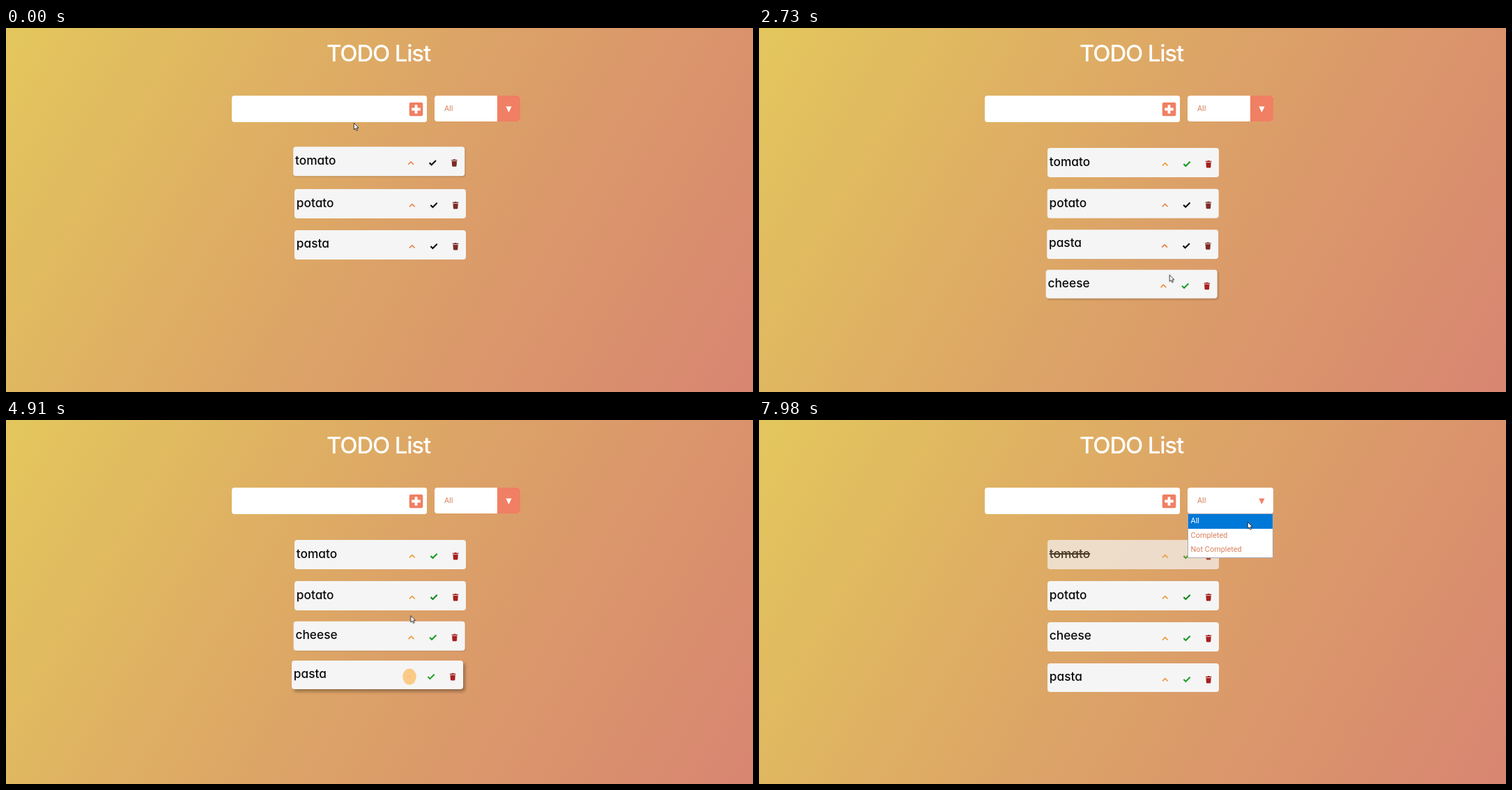
Write an HTML page that moves like this. It is 1072x522 px and loops after 8 s.

```html
<!DOCTYPE html>
<html lang="en">
<head>
<meta charset="utf-8">
<title>TODO List</title>
<style>
@property --lift { syntax: "<number>"; inherits: false; initial-value: 0; }
@property --glow { syntax: "<number>"; inherits: true; initial-value: 0; }

:root {
  --smooth: 8s linear infinite;
  --cut: 8s step-end infinite;
  --coral: #f07f63;
}
html, body { margin: 0; width: 100%; height: 100%; overflow: hidden; }
body {
  position: relative;
  background: linear-gradient(120deg, #e3c75c, #dca367 50%, #d88571);
  font-family: Inter, "Open Sans", sans-serif;
  font-feature-settings: "cv11";
  font-weight: 500;
}
body * { position: absolute; box-sizing: border-box; white-space: pre; }
svg { overflow: visible; left: 0; top: 0; }

h1 {
  margin: 0; left: 460px; top: 16px;
  font-size: 33px; line-height: 40px; font-weight: 500;
  font-optical-sizing: none; letter-spacing: -1.2px; color: #fff;
}

/* Entry field */
.entry { left: 323.7px; top: 97px; width: 280px; height: 38px; border-radius: 4px; background: #fff; overflow: hidden; }
.typed {
  left: 6px; top: 5px; height: 28px; font-size: 18.5px; line-height: 28px; color: #111;
  border-right: 1px solid transparent; animation: caret var(--cut);
}
.typed::before { content: ""; animation: type var(--cut); }
.add { right: 0; top: 0; width: 31px; height: 38px; background: #fff; color: var(--coral); animation: add var(--smooth); }

/* Filter */
.filter { left: 615px; top: 97.4px; width: 123px; height: 37px; border-radius: 4px; background: #fff; overflow: hidden; }
.filter, .menu { font: 10.9px/20.7px Roboto, sans-serif; color: #d9805c; }
.filter span { left: 14px; top: 8.5px; }
.drop { right: 0; top: 0; width: 33px; height: 37px; background: var(--coral); color: #fff; animation: drop var(--smooth); }
.menu {
  left: 615px; top: 134px; width: 123px; height: 63.6px; background: #fff; border: 1px solid #a9a9b4;
  visibility: hidden; animation: menu var(--cut);
}
.menu span { left: 0; width: 121px; height: 20.7px; padding-left: 3.6px; }
.menu span:nth-child(1) { top: 0; background: #0078d7; color: #fff; }
.menu span:nth-child(2) { top: 20.7px; }
.menu span:nth-child(3) { top: 41.4px; }

/* Items */
.row {
  --up: #e8844a; --ok: #0c0c0c; --bin: #7c2d26;
  left: 413.5px; width: 246px; height: 41.8px; border-radius: 4px; background: #f5f5f5;
  translate: calc(var(--lift) * -5.5px) calc(var(--lift) * -5.5px);
  box-shadow: calc(var(--lift) * 4px) calc(var(--lift) * 5px) calc(var(--lift) * 6px) rgb(0 0 0 / calc(var(--lift) * .42));
}
.row b { left: 3.3px; top: 8.5px; font-size: 17.3px; line-height: 22px; font-weight: 500; color: #0a0a0a; }
.r1 { top: 172px; animation: lift1 var(--smooth), glow1 var(--smooth), done var(--smooth), tone1 var(--cut); }
.r2 { top: 231px; animation: lift2 var(--smooth), tone2 var(--cut); }
.r3 { top: 289.8px; animation: lift3 var(--smooth), tone3 var(--cut); }
.r4 {
  top: 348.5px; --up: #ee9440; --ok: #22a02a; --bin: #a8201f;
  animation: lift4 var(--smooth), glow4 var(--smooth), fade4 var(--smooth);
}
.r1 b { text-decoration: line-through 2px transparent; animation: strike var(--cut); }
.early { animation: early var(--cut); }
.late { visibility: hidden; animation: late var(--cut); }
.halo { fill: #ff9d0a; opacity: var(--glow); }
.up { stroke: color-mix(in srgb, #fff3d8 calc(var(--glow) * 100%), var(--up)); stroke-width: 1.7; }
.ok { stroke: var(--ok); stroke-width: 2.1; }
.up, .ok { fill: none; }
.bin { fill: var(--bin); }

/* Pointer */
.pointer { left: 0; top: 0; animation: move var(--smooth); }
.pointer path { fill: #fff; stroke: #222; stroke-width: .9; stroke-linejoin: round; }
.arrow { animation: arrow var(--cut); }
.hand { visibility: hidden; animation: hand var(--cut); }
.beam { visibility: hidden; animation: beam var(--cut); }

@keyframes caret { 3.2% { border-color: #222; } 19%, 100% { border-color: transparent; } }
@keyframes type {
  0% { content: ""; }
  4.4% { content: "c"; }
  5.5% { content: "ch"; }
  6.6% { content: "che"; }
  8.5% { content: "chee"; }
  9.7% { content: "chees"; }
  10.9% { content: "cheese"; }
  19%, 100% { content: ""; }
}
@keyframes add {
  0%, 15.6% { background: #fff; color: #f07f63; }
  18.4%, 25.6% { background: #f07f63; color: #fff; }
  27.4% { background: #f6b9ad; color: #f7c6bb; }
  30%, 100% { background: #fff; color: #f07f63; }
}
@keyframes drop {
  0%, 89.7% { background: #f07f63; color: #fff; }
  93%, 100% { background: #fff; color: #f07f63; }
}
@keyframes menu { 93.75%, 100% { visibility: visible; } }

@keyframes lift1 {
  0% { --lift: .32; }
  2.5%, 27.5% { --lift: 0; }
  29.4% { --lift: .55; }
  33%, 64.8% { --lift: 0; }
  66.88% { --lift: .62; }
  69%, 79.5% { --lift: 1; }
  81.13% { --lift: .62; }
  84%, 100% { --lift: 0; }
}
@keyframes lift2 {
  0%, 29.7% { --lift: 0; }
  31% { --lift: .44; }
  34.5%, 61.4% { --lift: 0; }
  62.3% { --lift: .2; }
  64.5%, 100% { --lift: 0; }
}
@keyframes lift3 {
  0%, 31.1% { --lift: 0; }
  32.2% { --lift: .36; }
  35.5%, 60.3% { --lift: 0; }
  61.3% { --lift: .25; }
  64%, 100% { --lift: 0; }
}
@keyframes lift4 {
  0%, 32.4% { --lift: 0; }
  36.5%, 53.74% { --lift: 1; }
  53.75% { --lift: 0; }
  56.13% { --lift: .44; }
  58.5%, 60.2% { --lift: 1; }
  64.5%, 100% { --lift: 0; }
}
@keyframes glow1 {
  0%, 64.9% { --glow: 0; }
  66.3% { --glow: 1; }
  66.88% { --glow: .8; }
  70%, 100% { --glow: 0; }
}
@keyframes glow4 {
  0%, 35.5% { --glow: 0; }
  39.5%, 59.6% { --glow: 1; }
  63%, 100% { --glow: 0; }
}
@keyframes done { 0%, 70.6% { opacity: 1; } 75%, 100% { opacity: .7; } }
@keyframes strike { 70.6%, 100% { text-decoration-color: #0a0a0a; } }
@keyframes fade4 {
  0%, 18.99% { opacity: 0; }
  19%, 48.5% { opacity: 1; }
  53.7%, 53.75% { opacity: 0; }
  56.13% { opacity: .47; }
  58.5%, 100% { opacity: 1; }
}
@keyframes early { 53.75%, 100% { visibility: hidden; } }
@keyframes late { 53.75%, 100% { visibility: visible; } }
@keyframes tone1 { 19%, 100% { --up: #f0982e; --ok: #149a1c; --bin: #a4201f; } }
@keyframes tone2 {
  35% { --ok: #0a3210; }
  59%, 100% { --up: #ee9a38; --ok: #128a1c; --bin: #a4201f; }
}
@keyframes tone3 {
  35% { --ok: #04400f; }
  53.75%, 100% { --up: #ee9838; --ok: #1a9a22; --bin: #a8201f; }
}

@keyframes move {
  0%, .6% { translate: 499px 136px; }
  2%, 11.9% { translate: 498px 120px; }
  17%, 24.9% { translate: 589px 128px; }
  27.38% { translate: 602px 188px; }
  29.4% { translate: 600px 222px; }
  32% { translate: 592px 330px; }
  34.7% { translate: 588px 360px; }
  39%, 48.5% { translate: 579.7px 368.5px; }
  50%, 59% { translate: 579px 363.5px; }
  60.5% { translate: 580px 320px; }
  62.4% { translate: 581px 235px; }
  64.5% { translate: 581px 205px; }
  66% { translate: 582px 192px; }
  66.88% { translate: 595px 193px; }
  69%, 79.4% { translate: 609px 190px; }
  81.13% { translate: 648px 225px; }
  84% { translate: 690px 200px; }
  89.2% { translate: 713px 113px; }
  92%, 98% { translate: 713px 117px; }
  99.75%, 100% { translate: 701px 146px; }
}
@keyframes arrow {
  0%, 25.3%, 59.6%, 66.3%, 79.9%, 100% { visibility: visible; }
  1.4%, 35.5%, 65%, 68% { visibility: hidden; }
}
@keyframes hand {
  0%, 25.3%, 59.6%, 66.3%, 79.9%, 100% { visibility: hidden; }
  15.6%, 35.5%, 65%, 68% { visibility: visible; }
}
@keyframes beam { 1.4% { visibility: visible; } 15.6%, 100% { visibility: hidden; } }
</style>
</head>
<body>
<svg width="0" height="0">
  <symbol id="tools" overflow="visible">
    <ellipse class="halo" cx="169" cy="23" rx="9.8" ry="11.5"/>
    <path class="up" d="M164.9 25.5 168.8 21.6 172.7 25.5"/>
    <path class="ok" d="M195.4 23.1 198.4 26.1 204.7 19.8"/>
    <path class="bin" d="M226.8 18.8H229.4L230 18H232.2L232.8 18.8H235.4V20.1H226.8ZM227.4 20.8H234.8L234.3 27.6Q234.2 28.6 233.2 28.6H229Q228 28.6 227.9 27.6Z"/>
  </symbol>
</svg>

<h1>TODO List</h1>

<div class="entry">
  <span class="typed"></span>
  <div class="add">
    <svg width="31" height="38"><path fill="currentColor" fill-rule="evenodd" d="M8 9.7H23Q25.3 9.7 25.3 12V27Q25.3 29.3 23 29.3H8Q5.7 29.3 5.7 27V12Q5.7 9.7 8 9.7ZM13.6 13.2V17.6H9.2V21.4H13.6V25.8H17.4V21.4H21.8V17.6H17.4V13.2Z"/></svg>
  </div>
</div>

<div class="filter">
  <span>All</span>
  <div class="drop"><svg width="33" height="37"><path fill="currentColor" d="M12.4 15.4H20.6L16.5 24Z"/></svg></div>
</div>

<div class="row r1"><b>tomato</b><svg width="246" height="42"><use href="#tools"/></svg></div>
<div class="row r2"><b>potato</b><svg width="246" height="42"><use href="#tools"/></svg></div>
<div class="row r3"><b class="early">pasta</b><b class="late">cheese</b><svg width="246" height="42"><use href="#tools"/></svg></div>
<div class="row r4"><b class="early">cheese</b><b class="late">pasta</b><svg width="246" height="42"><use href="#tools"/></svg></div>

<div class="menu"><span>All</span><span>Completed</span><span>Not Completed</span></div>

<svg class="pointer" width="1" height="1">
  <path class="arrow" d="M.3.3V9.8L2.5 7.8 4 11.2 5.6 10.5 4.1 7.2H7Z"/>
  <path class="hand" d="M-1.1 1Q0-.6 1.1 1V5.3L4.6 6.1Q6.2 6.6 6 8.5L5 13.8H-.7L-3.6 8.8Q-3.9 7-2.4 7.4L-1.1 8.8Z"/>
  <path class="beam" d="M-2-6H2M0-6V6M-2 6H2"/>
</svg>
</body>
</html>
```
